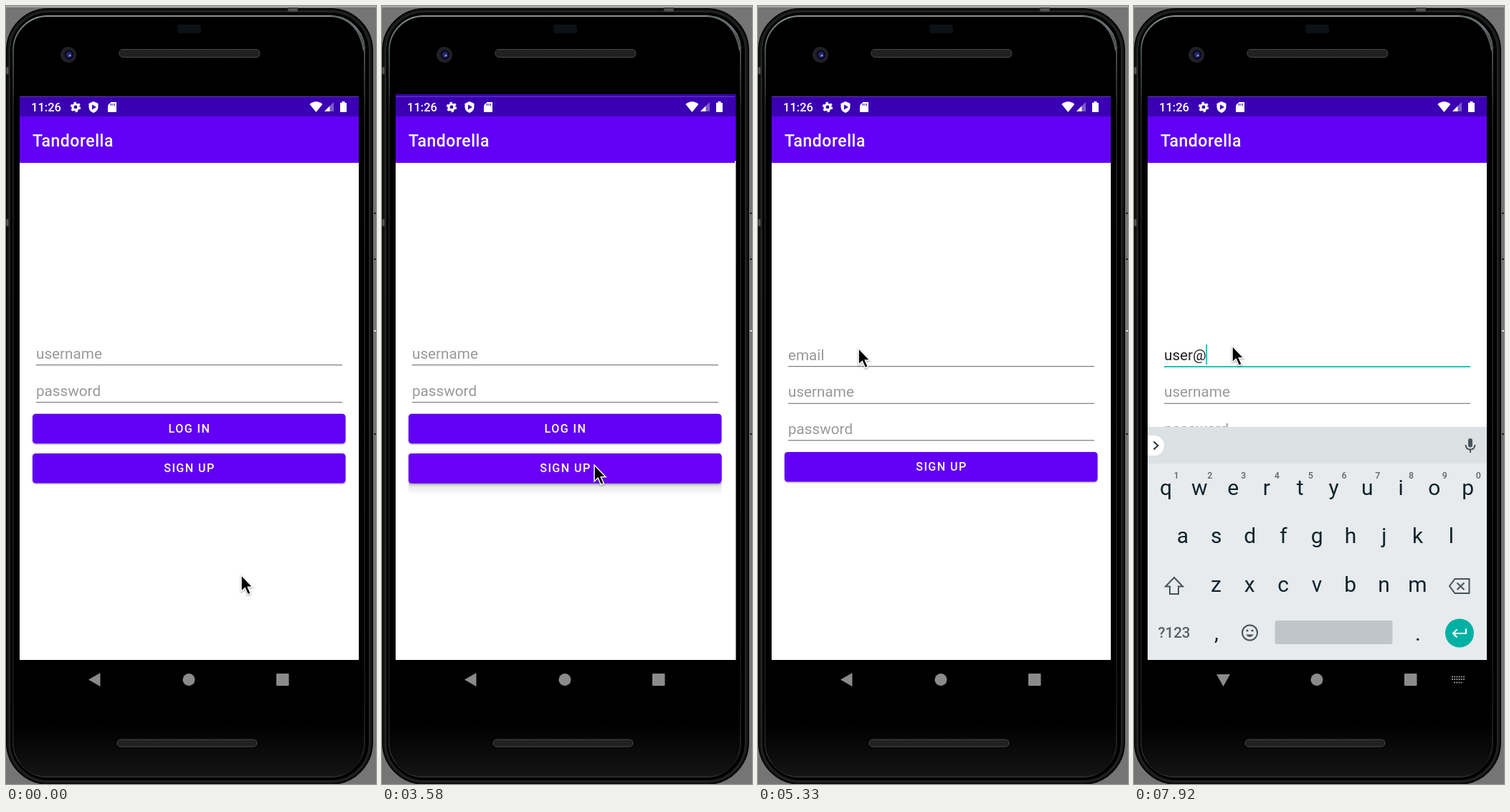
Animation of 516 by 1085 pixels, one loop 8 s. Source, as an HTML page:

```html
<!DOCTYPE html>
<html lang="en">
<head>
<meta charset="utf-8">
<title>Sign up</title>
<style>
html, body { margin: 0; width: 100%; height: 100%; overflow: hidden; background: #757575; }
svg { display: block; width: 516px; height: 1085px; font-family: Roboto, sans-serif; }
.medium { font-weight: 500; }
.title { font-size: 23px; letter-spacing: .5px; }
.field { font-size: 20.7px; fill: #999; }
.label { font-size: 16.1px; letter-spacing: 1.44px; text-anchor: middle; fill: #fff; }
.key { font-size: 30px; text-anchor: middle; fill: #10242c; }
.hint { font-size: 12.5px; text-anchor: middle; fill: #5b666a; }
.word { font-size: 20.5px; text-anchor: middle; fill: #566165; }
.line { fill: none; stroke: #46545a; stroke-width: 2; }
.raised { filter: drop-shadow(0 1px 1px #0005); }
</style>
</head>
<body>
<svg viewBox="0 0 516 1085">
  <defs>
    <linearGradient id="rim" x2="0" y2="1">
      <stop offset="0" stop-color="#8a9192"/><stop offset=".05" stop-color="#454a4b"/>
      <stop offset=".13" stop-color="#1c1e1e"/><stop offset=".9" stop-color="#141515"/>
      <stop offset="1" stop-color="#2a2c2c"/>
    </linearGradient>
    <linearGradient id="lift" x2="0" y2="1">
      <stop offset="0" stop-opacity=".24"/><stop offset=".4" stop-opacity=".08"/><stop offset="1" stop-opacity="0"/>
    </linearGradient>
    <linearGradient id="chin" x2="0" y2="1">
      <stop offset="0"/><stop offset="1" stop-color="#141414"/>
    </linearGradient>
    <pattern id="mesh" width="3" height="3" patternUnits="userSpaceOnUse">
      <rect width="3" height="3" fill="#191919"/><path d="M0 3L3 0" stroke="#303030"/>
    </pattern>
    <clipPath id="screenClip"><rect x="19" y="120" width="475" height="848"/></clipPath>
    <clipPath id="buttonClip"><rect x="37" y="624" width="436.5" height="41.5" rx="4.5"/></clipPath>
  </defs>

  <g id="phone">
    <path d="M0 1H516" stroke="#aaa" stroke-width="2"/>
    <rect x="1" y="4" width="510" height="1081" rx="58" fill="#161717" stroke="#080808" stroke-width="2"/>
    <rect x="5" y="8" width="502" height="1073" rx="54" fill="#000" stroke="#232525" stroke-width="2"/>
    <rect x="10" y="14" width="490" height="1061" rx="48" fill="#000" stroke="url(#rim)" stroke-width="2"/>
    <path d="M455 14Q492 19 499 62" fill="none" stroke="#5c6365" stroke-width="2"/>
    <path d="M12 1000H499V1026Q497 1074 452 1074H58Q14 1074 12 1026Z" fill="url(#chin)"/>
    <path d="M393 3H407V8H393ZM0 85H4V95H0ZM0 297H4V307H0Z" fill="#555" stroke="#222"/>
    <path d="M513 289H516M513 353H516M513 597H516" stroke="#222" stroke-width="2"/>
    <path d="M513 453H516" stroke="#ddd" stroke-width="2"/>
    <rect x="239" y="26" width="33" height="12" rx="3" fill="#0b1117"/>
    <rect x="158" y="60.500" width="196" height="11" rx="5" fill="url(#mesh)" stroke="#484848"/>
    <rect x="155" y="1023" width="195" height="10" rx="5" fill="url(#mesh)" stroke="#484848"/>
    <circle cx="87" cy="68" r="11" fill="#202127"/>
    <circle cx="88" cy="68" r="6.500" fill="#090a20"/>
    <circle cx="88" cy="68" r="4" fill="#25266a"/>
    <circle cx="89" cy="69" r="1.500" fill="#8a94cf"/>
  </g>

  <g clip-path="url(#screenClip)">
    <g id="edge">
      <rect x="19" y="123" width="474.500" height="31" fill="#3a00b2"/>
      <rect x="490" y="154" width="3.500" height="62" fill="#6100f5"/>
      <rect x="490" y="216" width="3.500" height="696" fill="#fff"/>
    </g>
    <g id="login"></g>
    <g id="signup"></g>
    <g id="keyboard"></g>
  </g>

  <g id="status" fill="#fff">
    <text x="35" y="147" class="medium" font-size="16.500">11:26</text>
    <g fill="none" stroke="#fff">
      <circle cx="97" cy="141" r="4" stroke-width="3.200"/>
      <circle cx="97" cy="141" r="6.200" stroke-width="2" stroke-dasharray="3.250"/>
    </g>
    <path d="M122 133L128.500 136V141Q128 147 122 149Q116 147 115.500 141V136Z"/>
    <path d="M120 137.500L126 141L120 144.500Z" fill="#3a00b2"/>
    <path d="M146.500 134H154V148H142V138.500Z"/>
    <path d="M146.500 136V139M149 136V139M151.500 136V139" stroke="#3a00b2"/>
    <path d="M423.500 137Q432.500 129.500 441.500 137L432.500 148Z"/>
    <path d="M457 134V147H444Z" opacity=".35"/>
    <path d="M451.500 139.500V147H444Z"/>
    <path d="M466 135H468.500V133H472.500V135H475V148H466Z"/>
  </g>

  <g id="nav" fill="#8b8b8b">
    <path id="back"/>
    <circle cx="255" cy="939.500" r="8.500"/>
    <rect x="377" y="931" width="17.500" height="17" rx="1"/>
    <path id="imeIcon" d="M443 935.500H461M443 939H461M446 943.500H458" stroke="#8b8b8b" stroke-width="2" stroke-dasharray="2 1.200"/>
  </g>

  <path id="pointer" d="M0 0V23L5.200 18.200L9.300 27.500L13.300 25.700L9.300 16.700H16Z" stroke="#fff" stroke-width="1.500"
    style="filter:drop-shadow(0 1px 1px #0006)"/>
</svg>

<script>
const $ = id => document.getElementById(id);
const LOOP = 8000, STEP = 1000 / 12;
const clamp = x => Math.min(1, Math.max(0, x));
const span = (t, from, to) => clamp((t - from) / (to - from));
const smooth = p => p * p * (3 - 2 * p);
const show = (id, on) => $(id).style.display = on ? '' : 'none';

const text = (x, y, cls, s, id = '') => `<text x="${x}" y="${y}" class="${cls}" id="${id}">${s}</text>`;
const rect = (x, y, w, h, fill, more = '') =>
  `<rect x="${x}" y="${y}" width="${w}" height="${h}" fill="${fill}" ${more}/>`;
const field = (y, lineY, name, id = name) =>
  text(42, y, 'field', name, id) + rect(42, lineY, 427, 1.2, '#7c7c7c', `id="${id}Line"`);
const button = (y, name, ripple = '') =>
  rect(37, y, 436.5, 41.5, '#6100f5', 'rx="4.5" class="raised"') + ripple +
  text(256, y + 26.3, 'label medium', name);
const page = body =>
  rect(19, 126.4, 473, 785.6, '#fff') + rect(19, 126.4, 473, 27.6, '#3a00b2') +
  rect(19, 154, 473, 64.8, '#6100f5') +
  `<g fill="#fff">${text(37, 195.5, 'title medium', 'Tandorella')}</g>` + body;

$('login').innerHTML = page(
  field(492, 500, 'username', 'loginName') + field(543.5, 552, 'password', 'loginPass') + button(568.8, 'LOG IN') +
  rect(37, 664, 436.5, 18, 'url(#lift)', 'id="shadow"') +
  button(624, 'SIGN UP', '<circle id="ripple" cx="296" cy="645" fill="#6a00f6" clip-path="url(#buttonClip)"/>'));
$('signup').innerHTML = page(
  field(494, 502, 'email') + field(545, 553.7, 'username') + field(597, 605.2, 'password') + button(622, 'SIGN UP') +
  rect(42, 472, 2, 28, '#00cdb8', 'id="caret"'));

const row = (letters, x, y) =>
  [...letters].map((c, i) => text(x + 46.8 * i, y, 'key', c)).join('');
const hints = [...'1234567890'].map((c, i) => text(59 + 46.8 * i, 659, 'hint medium', c)).join('');
$('keyboard').innerHTML =
  rect(19, 587, 473, 325, '#e7ebee') + rect(19, 587, 473, 51, '#dce1e3') +
  `<path d="M19 599H28A14 14 0 0 1 28 627H19Z" fill="#fff"/>
   <path d="M27.500 607.500L33.500 613L27.500 618.500" class="line" style="stroke:#263238"/>
   <g id="words">${text(123, 621, 'word', 'thanks') + text(254, 621, 'word', 'I') + text(384, 621, 'word', 'we')}
   <path d="M185.500 599V627M323.500 599V627" stroke="#c2c8ca"/></g>
   <rect x="466" y="603" width="6" height="12.500" rx="3" fill="#46545a"/>
   <path d="M462.500 612Q463 618.500 469 618.500T475.500 612M469 618.500V623" class="line"/>` +
  hints + row('qwertyuiop', 44.5, 682) + row('asdfghjkl', 68, 749) + row('zxcvbnm', 114.5, 817) +
  `<path d="M56 797L68 809.500H62V820H50V809.500H44Z" class="line"/>
   <path d="M447.500 799H467.500V819H447.500L440 809ZM450.500 804.500L460.500 814M460.500 804.500L450.500 814" class="line"/>
   <circle cx="161.500" cy="874" r="10.500" class="line"/>
   <path d="M156 876.500Q161.500 883.500 167 876.500Z" fill="#46545a"/>
   <circle cx="158" cy="871" r="1.600" fill="#46545a"/><circle cx="165" cy="871" r="1.600" fill="#46545a"/>
   <g style="fill:#3f4d52">${text(56, 881, 'word medium', '?123')}</g>` +
  text(115, 884, 'key', ',') + text(396, 885, 'key', '.') +
  rect(196.5, 857, 164, 33, '#bfc5c8', 'rx="3"') +
  `<circle cx="454" cy="874.500" r="20" fill="#00b1a3"/>
   <path d="M463 868.500V875H445M450.500 869.500L445 875L450.500 880.500" class="line" style="stroke:#fff"/>`;

// Pointer legs: start, end, target x, target y.
const legs = [[1340, 1830, 320.5, 682.5], [1930, 2830, 296, 640], [4600, 5400, 137, 474]];
const typed = 'user@', keyTimes = [7080, 7250, 7330, 7500, 7830];

function draw(now) {
  const t = Math.floor((now % LOOP + 5) / STEP) * STEP;

  let x = 328, y = 793.5;
  for (const [from, to, tx, ty] of legs) {
    const p = smooth(span(t, from, to));
    x += (tx - x) * p;
    y += (ty - y) * p;
  }
  $('pointer').setAttribute('transform', `translate(${x} ${y})`);

  // Press on the button, then the next window slides in.
  const press = span(t, 3320, 3560);
  $('ripple').setAttribute('r', 270 * Math.sqrt(press));
  $('shadow').setAttribute('opacity', press);
  show('edge', t > 3400 && t < 3830);
  const enter = span(t, 3800, 4225), slide = 32 * (1 - enter) ** 3;
  show('signup', enter > 0);
  $('signup').setAttribute('transform', `translate(0 ${slide})`);
  $('signup').setAttribute('opacity', span(t, 3770, 3950));
  $('login').setAttribute('transform', `translate(0 ${enter < 1 ? -15 * smooth(enter) : 0})`);
  show('login', enter < 1);

  // Focus, keyboard and typing.
  const focused = t > 5410, rise = span(t, 5470, 5700);
  const keys = keyTimes.filter(k => t + 5 >= k).length;
  const email = $('email');
  email.textContent = keys ? typed.slice(0, keys) : 'email';
  email.style.fill = keys ? '#222' : '';
  $('caret').setAttribute('x', keys ? 42 + email.getComputedTextLength() - .5 : 42);
  const blinkFrom = keys ? keyTimes[keys - 1] : 5420;
  show('caret', focused && Math.max(0, t - blinkFrom) % 1000 < 500);
  $('emailLine').setAttribute('fill', focused ? '#1cc8b3' : '#7c7c7c');
  $('emailLine').setAttribute('height', focused ? 2 : 1.2);
  show('keyboard', rise > 0);
  $('keyboard').setAttribute('transform', `translate(0 ${70 * (1 - rise) ** 2})`);
  $('keyboard').setAttribute('opacity', 1 - (1 - rise) ** 1.5);
  show('words', !keys);
  show('imeIcon', rise > 0);
  $('back').setAttribute('d', rise > 0 ? 'M115 932H134L124.500 949Z' : 'M115 939.500L131.500 930V949Z');
}

function loop() {
  draw(performance.now());
  requestAnimationFrame(loop);
}
loop();
</script>
</body>
</html>
```
